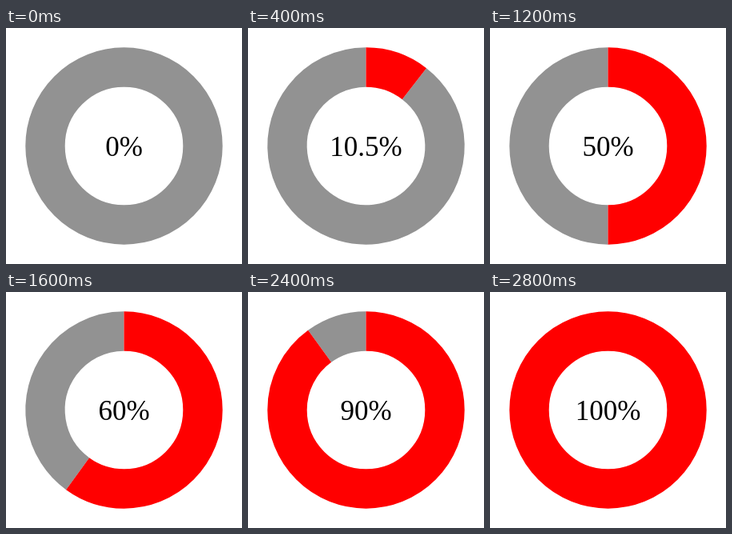
An HTML page with a canvas that plays this animation: 295x295 px, repeating every 3200 ms.

```html
<!DOCTYPE html>
<html lang="en">
<head>
<meta charset="utf-8">
<title>Progress ring</title>
<style>
  html, body { margin: 0; width: 100%; height: 100%; overflow: hidden; background: #fff; }
  canvas { display: block; width: 295px; height: 295px; }
</style>
</head>
<body>
<canvas id="stage"></canvas>
<script>
  const SIZE = 295, CENTER = 147.5;
  const OUTER = 123.2, INNER = 73.8;
  const STEP = 400;
  const STEPS = [0, 10.5, 25, 50, 60, 75, 90, 100];

  const canvas = document.getElementById('stage');
  const ratio = window.devicePixelRatio || 1;
  canvas.width = canvas.height = Math.round(SIZE * ratio);
  const ctx = canvas.getContext('2d');
  ctx.scale(ratio, ratio);

  // Ring section between two percentages, clockwise from the top.
  function section(from, to, color) {
    if (to <= from) return;
    const angle = p => p / 100 * 2 * Math.PI - Math.PI / 2;
    ctx.beginPath();
    ctx.arc(CENTER, CENTER, (OUTER + INNER) / 2, angle(from), angle(to));
    ctx.lineWidth = OUTER - INNER;
    ctx.strokeStyle = color;
    ctx.stroke();
  }

  function draw(percent) {
    ctx.fillStyle = '#fff';
    ctx.fillRect(0, 0, SIZE, SIZE);
    section(percent, 100, '#929292');
    section(0, percent, '#f00');
    ctx.fillStyle = '#000';
    ctx.font = '35px "Liberation Serif", serif';
    ctx.fontKerning = 'none';
    ctx.textAlign = 'center';
    ctx.textBaseline = 'alphabetic';
    ctx.fillText(percent + '%', CENTER, 159.5);
  }

  const start = performance.now();
  function tick() {
    const elapsed = performance.now() - start;
    draw(STEPS[Math.floor(elapsed / STEP) % STEPS.length]);
    requestAnimationFrame(tick);
  }
  tick();
</script>
</body>
</html>
```
